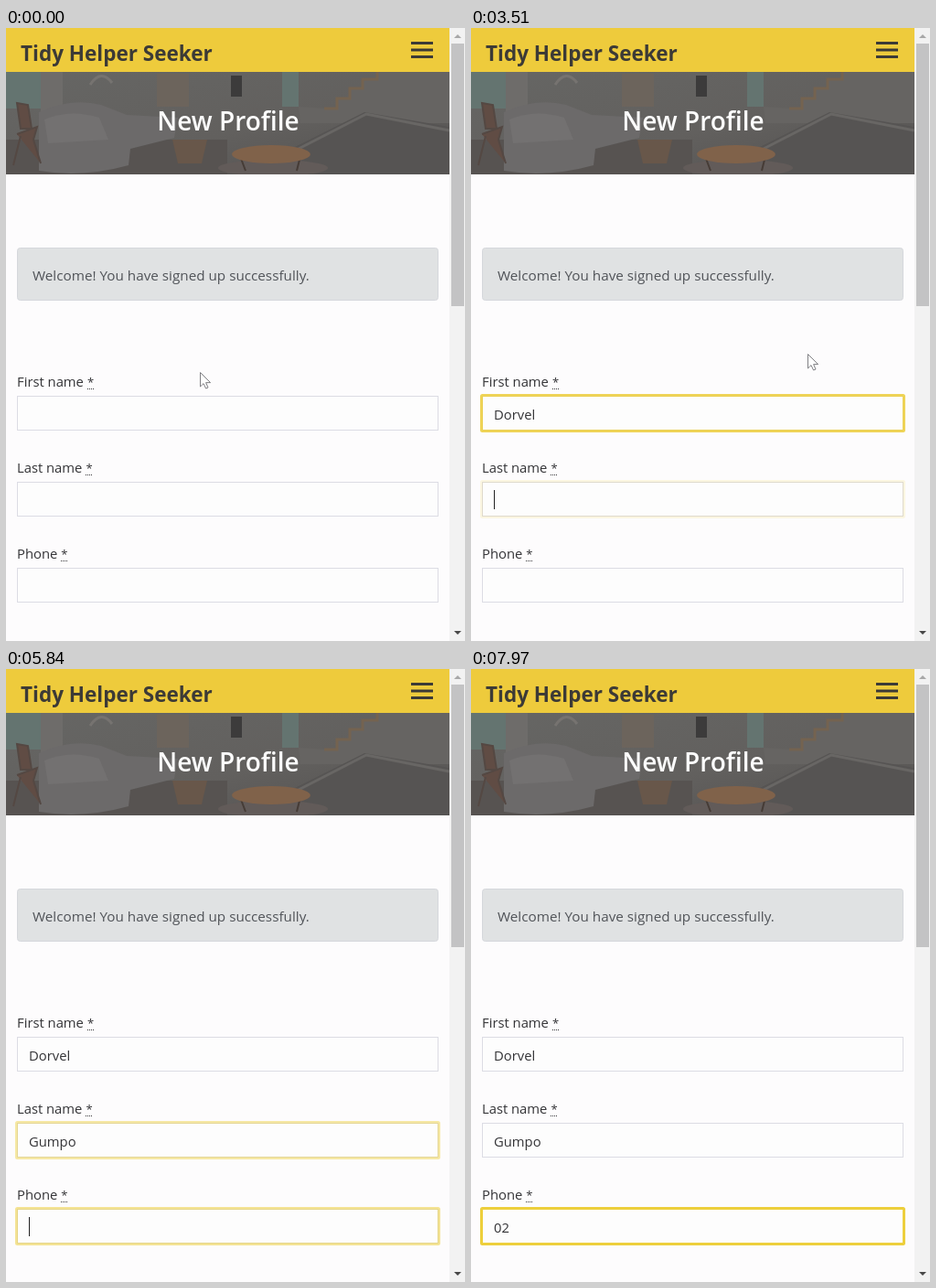
Recreate the animation shown at these times as an HTML page. Size 502 by 670 pixels, loop 8 s.

```html
<!DOCTYPE html>
<html lang="en">
<head>
<meta charset="utf-8">
<title>New Profile</title>
<style>
  html, body { margin: 0; width: 100%; height: 100%; overflow: hidden; background: #fdfcfd; }
  svg { display: block; width: 100vw; height: 100vh; }
  text { font-family: "Open Sans", "Noto Sans", sans-serif; font-size: 14.8px; fill: #333336; white-space: pre; }
  .brand { font-size: 22.5px; font-weight: 700; fill: #3c3a36; }
  .heading { font-size: 28px; font-weight: 600; fill: #fdfdfd; text-anchor: middle; }
  .notice { font-size: 15.25px; fill: #505358; }
  .star { font-size: 13px; }
  .box { fill: #fdfdfd; stroke: #dcdce4; }
  .focus { fill: none; stroke: #edcf3c; stroke-width: 3; }
</style>
</head>
<body>
<svg viewBox="0 0 502 670">
  <defs>
    <clipPath id="heroClip"><path d="M0 48H485V160H0Z"/></clipPath>
    <linearGradient id="wall" x2="1" y2="1">
      <stop stop-color="#666664"/><stop offset=".55" stop-color="#62605e"/><stop offset="1" stop-color="#52504f"/>
    </linearGradient>
  </defs>
  <rect width="502" height="670" fill="#fdfcfd"/>

  <g clip-path="url(#heroClip)">
    <rect y="48" width="485" height="112" fill="url(#wall)"/>
    <path d="M0 48H38V88H0ZM302 48H320V86H302Z" fill="#647470"/>
    <path d="M38 48H62V92H38Z" fill="#6e6c6a"/>
    <path d="M165 50H200V86H165Z" fill="#6c645c"/>
    <path d="M0 122H242V160H0Z" fill="#575351"/>
    <path d="M36 92Q70 76 104 84L132 95L188 98L184 120L136 132L134 150Q84 164 36 156Z" fill="#6c6a6a"/>
    <path d="M42 100Q70 88 102 98L112 122L46 126Z" fill="#737171"/>
    <path d="M12 82L24 84L28 110H16ZM12 116L34 108L30 122L38 148M16 118L8 150" fill="#604c44" stroke="#544843" stroke-width="2"/>
    <path d="M92 62Q104 44 116 60" fill="none" stroke="#767370" stroke-width="3"/>
    <path d="M246 52H258V75H246Z" fill="#3c3b3b"/>
    <path d="M182 122H220L214 148H188Z" fill="#68574a"/>
    <path d="M320 86L350 88H362V77H376V66H390V56H406V48H485V104H322Z" fill="#666462"/>
    <path d="M348 88H362V77H376V66H390V56H406V48" fill="none" stroke="#746350" stroke-width="3"/>
    <path d="M308 134L392 92L485 108V160H340Z" fill="#565453"/>
    <path d="M320 132L394 94L485 112" fill="none" stroke="#686664" stroke-width="3"/>
    <ellipse cx="292" cy="153" rx="60" ry="9" fill="#625b59"/>
    <path d="M256 140L262 156M322 140L318 156" stroke="#463c36" stroke-width="2"/>
    <ellipse cx="290" cy="138" rx="43" ry="10" fill="#80624a"/>
  </g>
  <text class="heading" x="243" y="112">New Profile</text>

  <rect width="485" height="48" fill="#eecb3c"/>
  <text class="brand" x="16" y="36">Tidy Helper Seeker</text>
  <path d="M443 16.5H467M443 24H467M443 31.5H467" stroke="#3c3a36" stroke-width="3"/>

  <rect x="12.5" y="240.5" width="460" height="57" rx="3" fill="#e0e2e3" stroke="#d5d7dc"/>
  <text class="notice" x="29" y="276">Welcome! You have signed up successfully.</text>

  <g id="form"></g>
  <path id="caret" d="M.5 0V21" stroke="#222"/>

  <rect x="485" width="17" height="670" fill="#f2f2f2"/>
  <rect x="487" y="17" width="14" height="287" fill="#c3c3c4"/>
  <path d="M490 11H498L494 7Z" fill="#a8a8a8"/>
  <path d="M490 659H498L494 663Z" fill="#484848"/>

  <circle id="ring" cx="210" cy="420" fill="none" stroke="#d2552c" stroke-width="2"/>
  <path id="pointer" d="M.5 .5V16L4 12.6L6.6 18L9 17L6.6 11.6H11.6Z" fill="#fff" stroke="#808084"/>
</svg>
<script>
const LOOP = 8000, FADE = 150, BLINK = 500, PITCH = 94, CLICK = 880, POINTER_HIDES = 4280;
const byId = id => document.getElementById(id);
const clamp = v => Math.max(0, Math.min(1, v));

// Each field: when it gains and loses focus, and when each character is typed.
const fields = [
  { label: "First name", value: "Dorvel", keys: [2150, 2400, 2640, 2860, 3060, 3260], from: CLICK, to: 3490 },
  { label: "Last name", value: "Gumpo", keys: [4280, 4540, 4800, 5080, 5360], from: 3490, to: 5760 },
  { label: "Phone", value: "02", keys: [6680, 7250], from: 5760, to: Infinity }
];
const pointerPath = [
  [0, 212, 376], [450, 206, 414], [900, 206, 414],
  [1080, 384, 394], [1110, 380, 390], [1450, 368, 356], [LOOP, 368, 356]
];

fields.forEach((field, i) => {
  const y = 402 + i * PITCH;
  byId("form").insertAdjacentHTML("beforeend", `<g>
    <text class="label" x="12" y="${y - 10}">${field.label}</text>
    <text class="star" y="${y - 10}">*</text>
    <path class="dots" stroke="#333336" stroke-dasharray="1 1"/>
    <rect class="box" x="12.5" y="${y + .5}" width="460" height="37"/>
    <rect class="focus" x="11.5" y="${y - .5}" width="462" height="39" rx="1"/>
    <text class="value" x="25" y="${y + 26}"></text></g>`);
  const group = byId("form").lastElementChild;
  const starX = 16 + group.querySelector(".label").getComputedTextLength();
  group.querySelector(".star").setAttribute("x", starX);
  group.querySelector(".dots").setAttribute("d", `M${Math.round(starX)} ${y - 7.5}h7`);
  field.y = y;
  field.text = group.querySelector(".value");
  field.outline = group.querySelector(".focus");
});

function pointerAt(t) {
  const i = pointerPath.findIndex(p => p[0] > t);
  const [t0, x0, y0] = pointerPath[i - 1], [t1, x1, y1] = pointerPath[i];
  const p = (t - t0) / (t1 - t0), ease = p * p * (3 - 2 * p);
  return [x0 + (x1 - x0) * ease, y0 + (y1 - y0) * ease];
}

function draw(t) {
  byId("caret").style.visibility = "hidden";
  for (const { value, keys, from, to, y, text, outline } of fields) {
    const typed = keys.filter(k => k <= t).length;
    text.textContent = value.slice(0, typed);
    outline.style.opacity = clamp((t - from) / FADE) - clamp((t - to) / FADE);
    if (t >= from && t < to) {
      const since = t - (typed ? keys[typed - 1] : from);
      const x = 25 + (typed ? Math.round(text.getComputedTextLength()) : 0);
      byId("caret").setAttribute("transform", `translate(${x} ${y + 9})`);
      byId("caret").style.visibility = since % (2 * BLINK) < BLINK ? "visible" : "hidden";
    }
  }
  const p = (t - CLICK) / 500;
  byId("ring").setAttribute("r", 6 + 6 * clamp(p));
  byId("ring").style.opacity = p < 0 ? 0 : clamp(2 - 2 * p);
  byId("pointer").setAttribute("transform", `translate(${pointerAt(t).map(Math.round)})`);
  byId("pointer").style.visibility = t < POINTER_HIDES ? "visible" : "hidden";
}

const start = performance.now();
function tick() {
  draw((performance.now() - start) % LOOP);
  requestAnimationFrame(tick);
}
tick();
</script>
</body>
</html>
```
